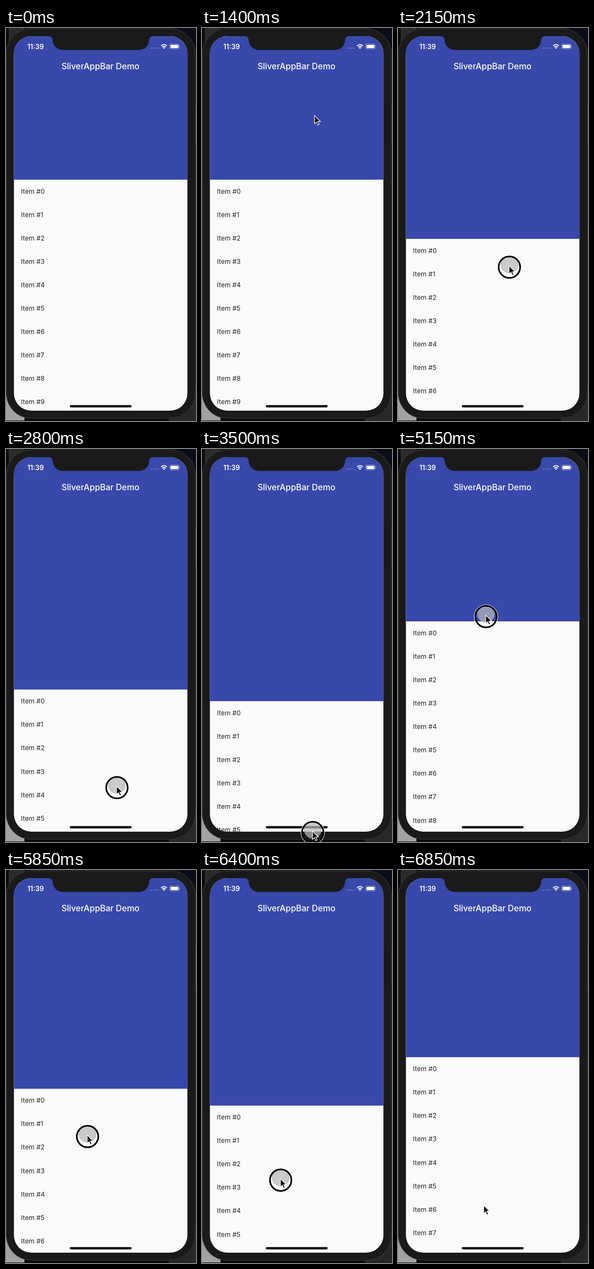
An HTML page that plays this animation: 350 by 723 pixels, repeating every 6900 ms.

```html
<!DOCTYPE html>
<html lang="en">
<head>
<meta charset="utf-8">
<title>SliverAppBar Demo</title>
<style>
  html, body { margin: 0; width: 100%; height: 100%; overflow: hidden; background: #0b0b0d; }
  svg { display: block; width: 350px; height: 723px; }
  text { font-family: Inter, Roboto, sans-serif; }
</style>
</head>
<body>
<svg viewBox="0 0 350 723">
  <defs>
    <clipPath id="screen"><rect x="14.6" y="15" width="319.600" height="689" rx="32"/></clipPath>
  </defs>

  <!-- desktop behind the phone -->
  <rect width="350" height="723" fill="#0b0b0d"/>
  <rect x="5" width="29" height="60" fill="#2b2b2c"/>
  <rect x="300" width="50" height="60" fill="#0a0d18"/>
  <rect x="300" y="660" width="50" height="63" fill="#28282a"/>
  <rect y="640" width="34" height="82" fill="#a2a2a2"/>

  <!-- phone -->
  <rect x="348" y="142" width="2" height="74" fill="#2e2e30"/>
  <rect x="0.5" y="1.5" width="348.5" height="716.5" rx="46" fill="#1a1a1a" stroke="#3c3c3e"/>
  <g clip-path="url(#screen)">
    <rect x="14" y="15" width="321" height="689" fill="#fafafa"/>
    <g id="list" font-size="12" letter-spacing="0.1" fill="#222"></g>
    <rect id="bar" x="14" y="15" width="321" fill="#3848ab"/>
    <text x="174" y="76" text-anchor="middle" font-size="15.5" font-weight="500" fill="#fff">SliverAppBar Demo</text>
    <rect x="117.5" y="693.7" width="114" height="4.2" rx="2.1"/>
  </g>
  <path d="M79 14V15A7 7 0 0 1 86 22A18.500 18.500 0 0 0 104.500 40.500H245A18.500 18.500 0 0 0 263.500 22A7 7 0 0 1 270.500 15V14Z" fill="#1a1a1a"/>

  <!-- status bar -->
  <g fill="#fff">
    <text x="39.2" y="38.5" font-size="12.5" font-weight="600">11:39</text>
    <path d="M268 37H281" fill="none" stroke="#fff" stroke-opacity=".3" stroke-width="2.4" stroke-linecap="round" stroke-dasharray="0 4"/>
    <path d="M285.5 32.8Q291 27.8 296.5 32.8M287.7 35.2Q291 32.3 294.3 35.2" fill="none" stroke="#fff" stroke-width="1.7"/>
    <path d="M291 38.6L289 36.600Q291 35.100 293 36.600Z"/>
    <rect x="301.5" y="29.5" width="17.5" height="9" rx="2.5" fill="none" stroke="#fff" stroke-opacity=".45"/>
    <rect x="303" y="31" width="14.5" height="6" rx="1.3"/>
    <path d="M320 32.5Q322 34 320 35.5Z" opacity=".5"/>
  </g>

  <!-- pointer: its origin is the tip of the arrow -->
  <g id="pointer">
    <g id="touch" fill="none">
      <circle cx="0.5" cy="-2.5" r="15.8" fill="#b9b9b9" fill-opacity=".72" stroke="#999" stroke-opacity=".6"/>
      <circle cx="0.5" cy="2.5" r="21.5" stroke="#fff" stroke-width="1.4"/>
      <circle cx="0.5" cy="2.5" r="19.8" stroke="#000" stroke-width="3"/>
    </g>
    <path d="M0 0V15L3.5 11.8L6 17.5L8.5 16.4L6 10.8H10.8Z" stroke="#fff" stroke-width="1.1"/>
  </g>
</svg>
<script>
const LOOP = 6900, STEP = 50, REST = 279, VIEW = 689;
const el = id => document.getElementById(id);

// Pointer stops; travel is how far the drag that starts there pulls the list
const stops = [
  { t: 350, x: 352, y: 392 },
  { t: 1480, x: 206, y: 159, travel: 486 },
  { t: 3500, x: 203.5, y: 703 },
  { t: 4000, x: 203.5, y: 718 },
  { t: 4950, x: 166, y: 239, travel: 400 },
  { t: 6700, x: 143.5, y: 583 },
  { t: 6850, x: 158, y: 617 }
];
const legs = stops.slice(1).map((to, i) => ({ from: stops[i], to }));

const clamp = u => Math.min(1, Math.max(0, u));
const easeOut = u => 1 - (1 - u) ** 1.78;
const progress = ({ from, to }, t) => easeOut(clamp((t - from.t) / (to.t - from.t)));

// Overscroll resistance and the overdamped spring that undoes it
const resist = d => VIEW * (1 - 1 / (1 + 0.52 * d / VIEW));
const spring = s => 1.7 * Math.exp(-9.08 * s) - 0.7 * Math.exp(-22 * s);

function overscroll(t) {
  const pull = legs.filter(l => l.from.travel && t >= l.from.t).pop();
  if (!pull) return 0;
  const released = Math.max(0, t - pull.to.t) / 1000;
  return resist(pull.from.travel * progress(pull, t)) * spring(released);
}

for (let i = 0; i < 10; i++) {
  el("list").innerHTML += `<text x="27.5" y="${25.8 + 43.07 * i}">Item #${i}</text>`;
}

function draw(t) {
  const edge = REST + overscroll(t);
  el("bar").setAttribute("height", edge - 15);
  el("list").setAttribute("transform", `translate(0 ${edge})`);

  const leg = legs.find(l => t <= l.to.t) || legs[legs.length - 1];
  const { from, to } = leg, u = progress(leg, t);
  const at = key => from[key] + (to[key] - from[key]) * u;
  el("pointer").setAttribute("transform", `translate(${at("x")} ${at("y")})`);
  el("pointer").style.display = t < stops[0].t ? "none" : "";
  el("touch").style.display = from.travel ? "" : "none";
}

const start = performance.now();
function frame() {
  const t = (performance.now() - start) % LOOP;
  draw(Math.floor(t / STEP) * STEP);
  requestAnimationFrame(frame);
}
frame();
</script>
</body>
</html>
```
